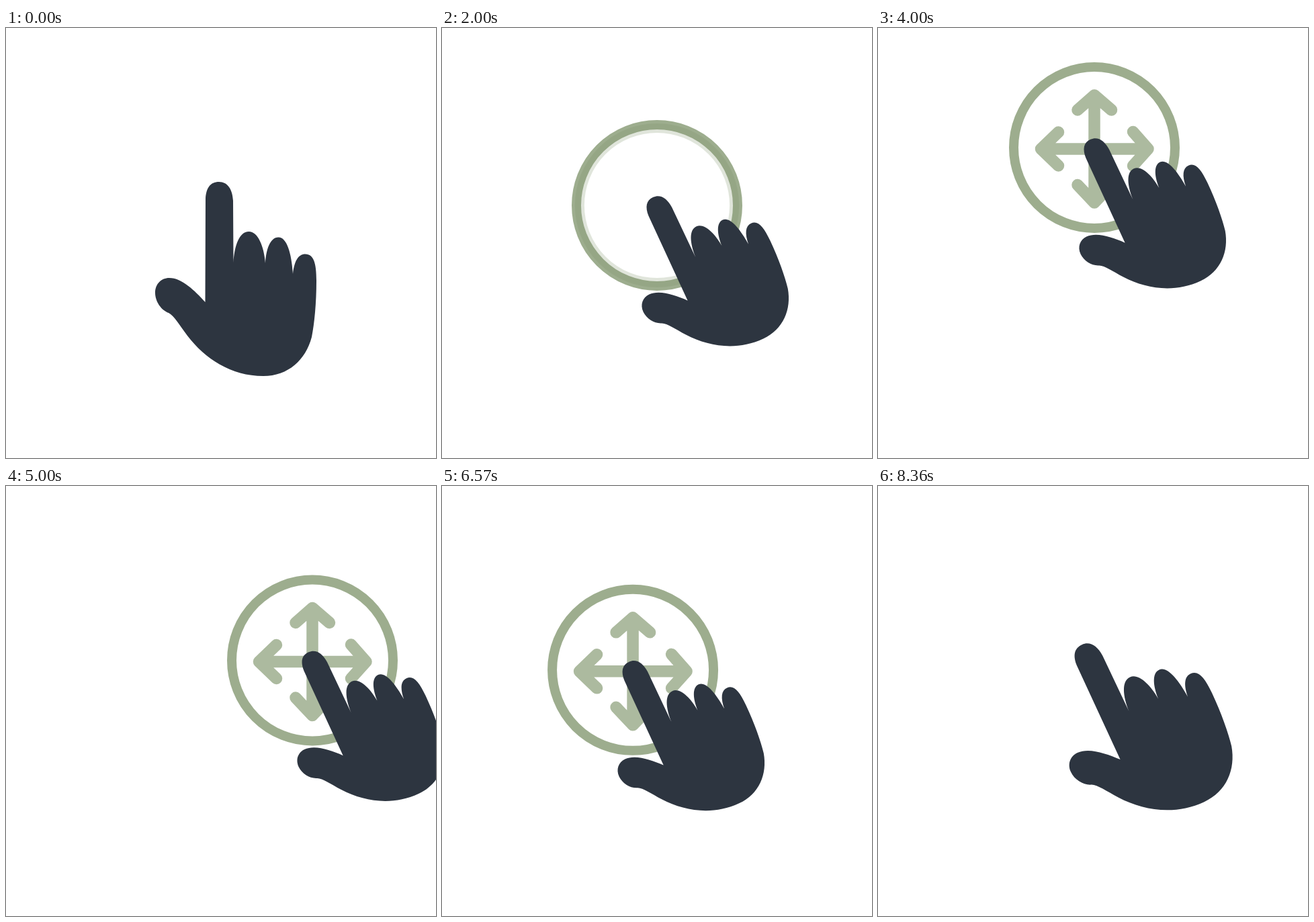
An HTML page with a canvas that plays this animation: 640 px wide and 640 px high, repeating every 9570 ms.

```html
<!DOCTYPE html>
<html lang="en">
<head>
<meta charset="utf-8">
<title>Tap and drag</title>
<style>
  html, body { margin: 0; width: 100%; height: 100%; overflow: hidden; background: #fff; }
  canvas { display: block; width: 100%; height: 100%; }
</style>
</head>
<body>
<canvas id="stage" width="640" height="640"></canvas>
<script>
const ctx = document.getElementById('stage').getContext('2d');
const LOOP = 9570, FPS = 14, LAST_STEP = 117;
const GREEN = '#7c9268', DARK = '#2d3540';

// Hand in its upright pose; it turns and scales about the palm.
const hand = new Path2D(`M296.5 408 L297 254 C298 238 304 229 317 229
  C330 229 337 240 338 257 L338.5 349 C340 324 347 303 361.5 303
  C375 303 384 325 386 350 C387 330 393 311.5 405.5 311.5
  C418 311.5 425 335 427 366 C429 347 435 336.5 445.5 336.5
  C458 336.5 462 350 462 376 C462 410 459 440 455 460
  C446 494 420 518 383 518 C335 518 296 492 270 458
  C258 442 250 428 242 424 C231 420 222 407 222 394
  C222 381 231 372 243 372 C262 372 281 391 296.5 408 Z`);
const palm = { x: 348.6, y: 416.8 };

// Drag route: time, x, y
const route = [
  [3040, 0, 0], [3350, -14, -16], [3650, -24, -48], [4000, 2, -86],
  [4300, 54, -100], [4650, 113, -71], [5000, 136, -4.5], [5350, 111, 59],
  [5700, 53, 86.5], [6000, -1.5, 80.5], [6300, -39, 47], [6570, -36, 10],
  [6800, -18, -2], [7000, -5, -3], [7140, 0, 0]
];

const clamp01 = v => Math.min(1, Math.max(0, v));
const span = (t, a, b) => clamp01((t - a) / (b - a));
const ease = (t, a, b) => { const u = span(t, a, b); return u * u * (3 - 2 * u); };
const easeOut = (t, a, b) => 1 - (1 - span(t, a, b)) ** 3;

function slope(i, axis) {
  const a = route[i - 1], b = route[i + 1];
  return a && b ? (b[axis] - a[axis]) / (b[0] - a[0]) : 0;
}

// Smooth curve through the route points
function drag(t) {
  const i = route.findIndex(p => p[0] > t) - 1;
  if (i < 0) return [0, 0];
  const a = route[i], b = route[i + 1], d = b[0] - a[0];
  const u = (t - a[0]) / d, v = 1 - u;
  return [1, 2].map(k =>
    a[k] * (1 + 2 * u) * v * v + b[k] * u * u * (3 - 2 * u) +
    d * u * v * (slope(i, k) * v - slope(i + 1, k) * u));
}

function ring(r, alpha) {
  if (r <= 0 || alpha <= 0) return;
  ctx.globalAlpha = alpha;
  ctx.lineWidth = 14;
  ctx.beginPath();
  ctx.arc(320, 264, r, 0, 2 * Math.PI);
  ctx.stroke();
}

function line(...pts) {
  for (let i = 0; i < pts.length; i += 2) {
    ctx[i ? 'lineTo' : 'moveTo'](pts[i], pts[i + 1]);
  }
}

function arrows(alpha) {
  if (alpha <= 0) return;
  ctx.globalAlpha = alpha;
  ctx.lineWidth = 17.5;
  ctx.beginPath();
  line(320, 186, 320, 346);
  line(240.5, 266, 400, 266);
  line(295, 208, 320, 186, 345.5, 208);
  line(295, 319.5, 320, 346, 345.5, 319.5);
  line(266.5, 241, 240.5, 266, 266.5, 291);
  line(377.5, 240.5, 400, 266, 377.5, 291);
  ctx.stroke();
}

function drawHand(t) {
  const turn = ease(t, 0, 1580);
  const press = ease(t, 200, 1000) - ease(t, 7240, 8357);
  const size = 1 - 0.1 * press;
  ctx.save();
  ctx.translate(palm.x + 62.9 * turn, palm.y - 23.8 * turn);
  ctx.rotate(-25 * turn * Math.PI / 180);
  ctx.scale(size, size);
  ctx.translate(-palm.x, -palm.y);
  ctx.globalAlpha = 1;
  ctx.fillStyle = DARK;
  ctx.fill(hand);
  ctx.restore();
}

function draw(t) {
  const shown = 1 - ease(t, 7200, 8340);
  ctx.globalAlpha = 1;
  ctx.fillStyle = '#fff';
  ctx.fillRect(0, 0, 640, 640);
  ctx.save();
  ctx.translate(...drag(t));
  ctx.strokeStyle = GREEN;
  ctx.lineCap = ctx.lineJoin = 'round';
  ring(120 * easeOut(t, 308, 2073), 0.75 * shown);
  ring(120 * easeOut(t, 842, 2607), 1 - ease(t, 1350, 2300));
  arrows(0.63 * ease(t, 2050, 2950) * shown);
  drawHand(t);
  ctx.restore();
}

const start = performance.now();
function tick() {
  const t = (performance.now() - start) % LOOP;
  const step = Math.min(LAST_STEP, Math.floor((t + 5) * FPS / 1000));
  draw(step * 1000 / FPS);
  requestAnimationFrame(tick);
}
tick();
</script>
</body>
</html>
```
